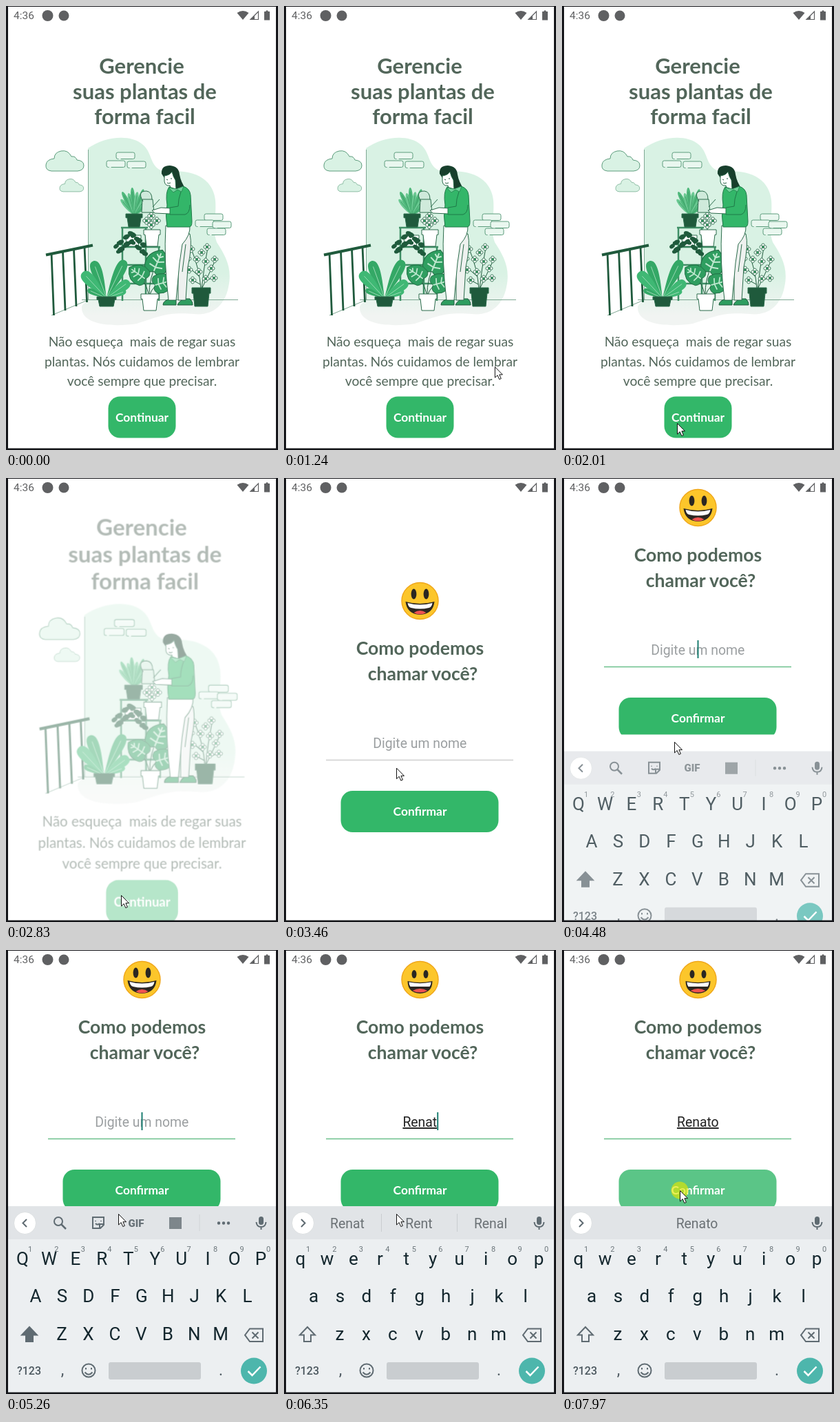
Recreate the animation shown at these times as an HTML page. Size 395 px wide and 643 px high, loop 8000 ms.

```html
<!DOCTYPE html>
<html lang="pt-BR">
<head>
<meta charset="utf-8">
<title>Gerencie suas plantas</title>
<style>
  html, body { margin: 0; width: 100%; height: 100%; overflow: hidden; background: #fff; }
  svg { display: block; width: 395px; height: 643px; }
  text { text-anchor: middle; white-space: pre; }
  .geo { font-family: Lato, sans-serif; fill: #52665a; }
  .bold { font-weight: 700; }
  .label { font-size: 17.4px; font-weight: 700; fill: #fff; }
  .rob { font-family: Roboto, sans-serif; }
  .line { fill: none; stroke: #5f6b72; stroke-width: 2; }
  .ink { fill: #fff; stroke: #2b6b4b; stroke-width: 1; stroke-linejoin: round; }
</style>
</head>
<body>
<svg viewBox="0 0 395 643">
  <defs>
    <linearGradient id="wall" x2="0" y2="1">
      <stop offset=".72" stop-color="#d9f2e4"/><stop offset=".95" stop-color="#f1f4f2"/>
    </linearGradient>
    <g id="flower" fill="#fff" stroke="#2b6b4b" stroke-width=".9">
      <circle cy="-3" r="2.3"/><circle cx="3" r="2.3"/><circle cy="3" r="2.3"/><circle cx="-3" r="2.3"/>
      <circle r="1.5" fill="#33b669"/>
    </g>
    <clipPath id="window"><path id="windowShape"/></clipPath>
  </defs>
  <rect width="395" height="643" fill="#fff"/>

  <g id="home">
    <g class="geo bold" font-size="31">
      <text x="197" y="98">Gerencie</text>
      <text x="201.500" y="134.500">suas plantas de</text>
      <text x="201.500" y="171">forma facil</text>
    </g>
    <g id="art"></g>
    <g class="geo" font-size="19.200">
      <text x="197.500" y="493">Não esqueça  mais de regar suas</text>
      <text x="197.500" y="521.500">plantas. Nós cuidamos de lembrar</text>
      <text x="197.500" y="550">você sempre que precisar.</text>
    </g>
    <g id="continueButton">
      <rect x="148.500" y="565.500" width="98" height="60" rx="17" fill="#33b769"/>
      <text class="geo label" x="197.500" y="601.500">Continuar</text>
    </g>
  </g>

  <g clip-path="url(#window)"><g id="form">
    <g transform="translate(197.500 178)">
      <circle r="26.500" fill="#fcc62b" stroke="#f0a81c" stroke-width="1.500"/>
      <g id="smileBig" fill="#2b2722">
        <ellipse cx="-9" cy="-10" rx="3.900" ry="7.500"/><ellipse cx="9" cy="-10" rx="3.900" ry="7.500"/>
        <path d="M-21 1Q0 7 21 1Q19 19 0 20Q-19 19-21 1"/>
        <path d="M-18 3Q0 8 18 3Q17 9 13 10Q0 13-13 10Q-17 9-18 3" fill="#fff"/>
        <path d="M-9 17Q0 11 9 17Q0 22-9 17" fill="#ef5350"/>
      </g>
      <g id="smileTeeth" fill="#2b2722">
        <ellipse cx="-8.500" cy="-8" rx="3.500" ry="6"/><ellipse cx="8.500" cy="-8" rx="3.500" ry="6"/>
        <path d="M-18 2Q0 6 18 2Q18 19 0 20Q-18 19-18 2"/>
        <path d="M-16 3.500Q0 7 16 3.500Q16 8 14 10H-14Q-16 8-16 3.500" fill="#fff"/>
        <path d="M-11 16Q0 10 11 16Q0 21-11 16" fill="#ef5350"/>
      </g>
    </g>
    <g class="geo bold" font-size="26.600">
      <text x="197.500" y="256">Como podemos</text>
      <text x="201.500" y="293">chamar você?</text>
    </g>
    <text id="field" class="rob" x="197.300" y="391" font-size="19.400"></text>
    <path id="fieldLine" d="M61 408.500H333" stroke-width="1.500"/>
    <rect id="caret" y="370" width="2" height="26" fill="#1c7f72"/>
    <g id="confirmButton">
      <rect x="82.500" y="453" width="229" height="60" rx="17" fill="#33b769"/>
      <text class="geo label" x="197.500" y="489">Confirmar</text>
    </g>
  </g></g>

  <g id="keyboard">
    <path d="M0 371H395V700H0Z" fill="#eceff1"/>
    <path d="M0 371H395V419H0Z" fill="#e1e4e7"/>
    <circle cx="27.500" cy="395.500" r="16" fill="#fff" stroke="#d4d8da" stroke-width=".7"/>
    <path id="chevron" class="line"/>
    <g id="tools" class="line">
      <circle cx="76" cy="393" r="6"/><path d="M80.500 397.500L87 404" stroke-width="2.500"/>
      <path d="M126 387H142V398L137 403H126ZM142 397H136V403M130 392V393M138 392V393M130 396Q133 399 136 396"/>
      <rect x="237" y="387" width="18" height="17" fill="#7d868b" stroke="none"/>
      <path d="M281 383V407" stroke="#d0d4d6" stroke-width="1"/>
      <path d="M309 395.500H325" stroke-width="4.500" stroke-linecap="round" stroke-dasharray="0 7"/>
      <text class="rob" x="189" y="400.500" font-size="15" font-weight="900" fill="#687278" stroke="none">GIF</text>
    </g>
    <g id="suggestions" class="rob" font-size="19.400" fill="#6b7175">
      <text x="92" y="403"></text><text x="196" y="403"></text><text x="300" y="403"></text>
      <path id="dividers" d="M141.500 382V408M251.500 382V408" stroke="#c9cdd0"/>
    </g>
    <rect x="367" y="386" width="7" height="12" rx="3.500" fill="#5f6b72"/>
    <path class="line" d="M363.500 394Q364 401 370.500 401T377.500 394M370.500 401V405"/>
    <g id="keys" class="rob" font-size="26" fill="#14272e"></g>
    <g id="digits" class="rob" font-size="11" fill="#6c767b"></g>
    <path id="shift" class="line" d="M34 546L45 557.500H39V567H29V557.500H23Z"/>
    <path class="line" d="M354 548.500H373V567H354L347 557.700ZM357.500 553.500L366.500 562.500M366.500 553.500L357.500 562.500"/>
    <g class="rob" fill="#4d5960">
      <text x="33.500" y="615" font-size="16" font-weight="500">?123</text>
      <text x="82" y="616" font-size="23">,</text><text x="312" y="616" font-size="23">.</text>
    </g>
    <circle class="line" cx="120" cy="609" r="9.500"/>
    <path class="line" d="M116 605V607.500M124 605V607.500M114.500 611.500Q120 618 125.500 611.500"/>
    <rect x="149" y="597" width="134" height="25" rx="3" fill="#c9cdd0"/>
    <circle cx="360" cy="609.500" r="19" fill="#4db6ac"/>
    <path d="M351.500 610L357.500 616L369.500 603.500" fill="none" stroke="#fff" stroke-width="2.500"/>
  </g>

  <g fill="#5f6062">
    <text class="rob" x="26" y="19" font-size="15.500">4:36</text>
    <circle cx="60.500" cy="14" r="8"/><circle cx="84" cy="14" r="7.500"/>
    <path d="M335.500 10Q344 4 352.500 10L344 20Z"/>
    <path d="M355 19.500H366.500V8Z" fill="none" stroke="#5f6062" stroke-width="1.200"/><path d="M355 20L361 14V20Z"/>
    <path d="M375 8H377.500V6.500H380.500V8H383V20.500H375Z"/>
  </g>

  <g id="pointer">
    <circle id="click" r="12.500" fill="#e3e600" opacity=".65"/>
    <path d="M.5.5V16L4.200 12.600L6.800 18.500L9.400 17.400L6.900 11.700H11.500Z" fill="#fff" stroke="#111"/>
  </g>
  <path d="M0 0H395V643H0ZM3 1V640.500H392V1Z" fill="#15161a" fill-rule="evenodd"/>
</svg>

<script>
const $ = id => document.getElementById(id);
const DARK = '#1f5a3c', GREEN = '#33b669', MID = '#2f9e60';

// --- illustration ---
// A leaf grows up from (x, y); belly < 1 keeps the base slim and the tip round.
const leaf = (x, y, angle, length, width, fill, vein, belly) =>
  `<g transform="translate(${x} ${y}) rotate(${angle})"><path fill="${fill}"
   d="M0 0C${-width * belly} ${-length * .35} ${-width} ${-length} 0 ${-length}C${width} ${-length} ${width * belly} ${-length * .35} 0 0"/>
   <path d="M0 0V${-length * .85}" stroke="${vein}" stroke-width=".8"/></g>`;
const fan = (x, y, leaves, fills, vein, belly) =>
  leaves.map(([a, l, w], i) => leaf(x, y, a, l, w, fills[i % fills.length], vein, belly)).join('');
const pot = (x, y, w, h, fill) =>
  `<path class="ink" style="fill:${fill}" d="M${x} ${y}h${w}v${h * .3}h-2l-2 ${h * .7}h${8 - w}l-2 ${-h * .7}h-2z"/>`;
const brick = ([x, y]) => `<rect x="${x}" y="${y}" width="27" height="9.500" rx="2.500" stroke-dasharray="52 3"/>`;
const flowers = (points, scale) => points.map(([x, y]) =>
  `<use href="#flower" transform="translate(${x} ${y}) scale(${scale})"/>`).join('');
const cloud = (x, y, s) => `<path transform="translate(${x} ${y}) scale(${s})" fill="#d9f2e4" stroke="#5c9c7c"
  d="M8 30H46Q55 29 55 22T45 14Q43 8 37 9Q32-1 22 1Q12 3 12 12Q1 13 0 21T8 30Z"/>`;
const monstera = (x, y, angle, s) => `<g transform="translate(${x} ${y}) rotate(${angle}) scale(${s})">
  <path fill="${MID}" stroke="#1f6b42" d="M0 14Q-8 21-15 13Q-22-8 0-19Q22-8 15 13Q8 21 0 14Z"/>
  <path d="M0 14V-14M0 8L-10 6M0 8L10 6M0 0L-9-4M0 0L9-4M0-7L-5-11M0-7L5-11" stroke="#bfe8cf" stroke-width="2"/></g>`;

const railPosts = [[66, 358, 448], [82.5, 355, 441], [98.5, 352, 435], [114, 349, 429]]
  .map(([x, top, bottom]) => `M${x} ${top}L${x + 3.5} ${bottom}`).join('');
const vines = [...Array(26)].map((_, i) => {
  const x = 160 + i * 17 % 43, y = 329 + i * 11 % 22 + Math.abs(x - 181) * .9;
  return `<ellipse cx="${x}" cy="${y}" rx="4.200" ry="2.900" transform="rotate(${i * 37 % 70 - 35} ${x} ${y})"/>`;
}).join('');

$('art').innerHTML = `
  <path fill="url(#wall)" d="M119 206C142 190 179 184 199 201C214 214 208 236 232 240C270 236 300 248 304 281
    C306 307 299 323 306 342C319 362 329 380 323 407C318 434 299 449 273 446C235 443 224 449 190 460
    C158 465 110 463 110 437C110 429 119 432 119 420Z"/>
  ${cloud(58, 209, 1)}${cloud(78, 250, .63)}
  <g fill="#e9f7ef" stroke="#5c9c7c">
    ${[[160, 212], [146, 224], [176, 225], [288, 301], [275, 310], [300, 312], [292, 322]].map(brick).join('')}
  </g>
  <path d="M119.500 208V426M110 425.500H337M66 448L121 425" stroke="#7fa893" fill="none"/>
  <path d="${railPosts}" stroke="${DARK}" stroke-width="2.800"/>
  <path d="M58 360.500L126 346.500" stroke="${DARK}" stroke-width="4"/>
  <path d="M167 321H206M167 349H224M167 375H224M167 402H224M169 320V427M203 320V427M222 349V427"
    stroke="#3f8f66" stroke-width="2.500" fill="none"/>
  ${fan(186, 303, [[-40, 30, 4], [-27, 38, 4], [-14, 33, 4], [-4, 40, 4], [8, 34, 4], [20, 40, 4], [34, 31, 4], [50, 24, 4]],
    ['#69c891', '#4fb87b'], '#3b9a65', 1)}
  ${pot(174, 301, 24, 19, DARK)}
  ${pot(172, 332, 24, 16, '#fff')}<g fill="${DARK}">${vines}</g>
  <path d="M211 326V302M211 320L204 310M211 320L220 311" stroke="${DARK}"/>
  ${pot(200, 324, 24, 24, '#fff')}
  ${flowers([[211, 304], [204, 311], [219, 311], [211, 317]], 1)}
  <path d="M208 420Q207 395 220 370M208 420Q203 400 193 388M208 420Q214 402 228 402" stroke="${DARK}" fill="none"/>
  ${monstera(220, 371, 22, 1)}${monstera(192, 388, -55, .85)}${monstera(228, 401, 75, .85)}
  ${pot(196, 417, 26, 24, '#fff')}
  ${fan(146, 423, [[-20, 57, 15], [-43, 51, 16], [26, 61, 15], [54, 41, 14], [-66, 30, 8], [70, 30, 8]],
    ['#34a866', '#3fb874'], '#a5dfbd', .3)}
  ${pot(132, 421, 28, 14, DARK)}
  <path d="M283 410Q281 380 269 352M284 410Q287 380 293 350M284 410Q294 390 304 368M281 392L265 378M282 403L269 396M288 399L303 392"
    stroke="${DARK}" fill="none"/>
  ${flowers([[269, 352], [292, 349], [303, 367], [264, 366], [277, 367], [290, 370], [298, 380], [266, 382], [280, 385], [302, 394], [271, 397], [290, 395], [284, 357]], .95)}
  ${pot(270, 408, 27, 27, DARK)}

  <path d="M228 433Q228 426 240 424H247V433ZM249 433Q252 426 260 424H267Q272 429 271 433Z" fill="${MID}" stroke="${DARK}"/>
  <path class="ink" d="M246 330H267Q271 347 264 378L261 426H250L250 378Z" style="fill:#eef1ef"/>
  <path class="ink" d="M232 318H267Q268 332 256 345L252 372L247 426H236Q229 370 232 318ZM261 345L256 385"/>
  <path d="M226 243Q225 231 238 231Q251 232 252 244Q254 256 262 266Q251 272 240 264Z" fill="#173f2c"/>
  <path class="ink" d="M230 246Q238 245 241 240Q243 248 246 252L247 266L239 264L238 260Q231 261 230 254Z"/>
  <path d="M233 251L235 252M239 250L241 250M234 256Q236 258 239 256" stroke="${DARK}" fill="none"/>
  <path d="M237 262L249 266L257 261Q267 264 268 274L270 312Q270 320 266 320H234Q231 304 234 288Q231 270 237 262Z" fill="${GREEN}" stroke="#1f7a48"/>
  <path d="M236 263L243 270L249 266L255 269L258 261L247 265Z" fill="#6fd199" stroke="#1f7a48" stroke-width=".7"/>
  <path class="ink" d="M198 280H213L215 299H197ZM213 291L223 280M199 283Q190 268 204 268Q212 269 212 280" style="fill:#cfeadb"/>
  <path class="ink" d="M240 293L225 292L212 296L216 300L239 301Z"/>
  <path d="M254 269Q250 280 250 290L238 292V302H260Q267 300 267 288" fill="${GREEN}" stroke="#1f7a48"/>
`;

// --- keyboard ---
const rows = [['qwertyuiop', 24, 456], ['asdfghjkl', 43, 510], ['zxcvbnm', 81, 565]];
const drawKeys = upper => rows.map(([letters, x, y]) => [...letters].map((c, i) =>
  `<text x="${x + i * 38.45}" y="${y}">${upper ? c.toUpperCase() : c}</text>`).join('')).join('');
$('digits').innerHTML = [...'1234567890'].map((d, i) =>
  `<text x="${35 + i * 38.45}" y="437">${d}</text>`).join('');

// --- timeline ---
const LOOP = 8000, SCROLL_AT = 4400, FOCUS_AT = 4040;
const typing = [
  [5560, 'R', ['R', 'Re', 'Rio']],
  [5950, 'Re', ['Re', 'Real', 'Red']],
  [6100, 'Ren', ['Ren', 'Rent', 'Rental']],
  [6200, 'Rena', ['Rena', 'Renal', 'Renew']],
  [6350, 'Renat', ['Renat', 'Rent', 'Renal']],
  [6510, 'Renato', ['', 'Renato', '']],
];
const pointerPath = [
  [960, 362, 640], [1200, 318, 535], [1430, 250, 463], [1620, 190, 488], [1760, 161, 530],
  [1880, 157, 575], [2010, 167, 604], [2980, 167, 604], [3200, 166, 535], [3460, 163, 420],
  [3590, 163, 376], [3690, 163, 382], [7460, 163, 382], [7710, 171, 348],
];
const clicks = [[2390, 2470], [3940, 4020], [7870, LOOP]];

const clamp = v => Math.min(1, Math.max(0, v));
const span = (t, from, to) => clamp((t - from) / (to - from));
const within = (t, from, to) => t >= from && t < to;
const show = (id, on) => $(id).setAttribute('display', on ? 'inline' : 'none');
const set = (id, name, value) => $(id).setAttribute(name, value);

function along(path, t) {
  const i = path.findIndex(p => p[0] > t);
  if (i < 0) return path.at(-1).slice(1);
  if (i === 0) return path[0].slice(1);
  const [a, b] = [path[i - 1], path[i]], k = span(t, a[0], b[0]);
  return [a[1] + (b[1] - a[1]) * k, a[2] + (b[2] - a[2]) * k];
}

let keysUpper = null;
function drawKeyboard(t, typed) {
  const k = 1 - (1 - span(t, SCROLL_AT, 4620)) ** 2;
  const upper = !typed;
  show('keyboard', t >= SCROLL_AT);
  set('keyboard', 'transform', `translate(0 ${62 * (1 - k)})`);
  set('keyboard', 'opacity', .35 + .65 * k);
  if (upper !== keysUpper) $('keys').innerHTML = drawKeys(keysUpper = upper);
  set('shift', 'style', upper ? 'fill:#5f6b72' : '');
  set('chevron', 'd', upper ? 'M30 390L24.500 395.500L30 401' : 'M25 390L30.500 395.500L25 401');
  show('tools', upper);
  show('suggestions', !upper);
  if (typed) {
    document.querySelectorAll('#suggestions text').forEach((el, i) => el.textContent = typed[2][i]);
    show('dividers', typed[2][0]);
  }
}

function drawForm(t, typed) {
  const scrolled = t >= SCROLL_AT;
  set('form', 'opacity', span(t, 2850, 3010));
  set('form', 'transform', `translate(0 ${scrolled ? -135 : 0})`);
  set('windowShape', 'd', `M0 0H395V${scrolled ? 371.5 : 643}H0Z`);
  show('smileBig', !typed);
  show('smileTeeth', typed);
  const field = $('field');
  field.textContent = typed ? typed[1] : 'Digite um nome';
  field.setAttribute('fill', typed ? '#222' : '#9b9fa1');
  field.setAttribute('text-decoration', typed ? 'underline' : 'none');
  set('fieldLine', 'stroke', t >= FOCUS_AT ? '#6cc08c' : '#cfcfcf');
  set('caret', 'x', typed ? 197.3 + field.getComputedTextLength() / 2 : 196.5);
  show('caret', within(t, FOCUS_AT, 4770) || within(t, 5260, 7000) || within(t, 7490, 7960));
  set('confirmButton', 'opacity', 1 - .2 * span(t, 7870, 7960));
}

function drawHome(t) {
  const grow = 1 - (1 - span(t, 2670, 3070)) ** 4.3;
  const s = 1 + .075 * grow;
  show('home', t < 2970);
  set('home', 'transform', `translate(197.500 318) scale(${s}) translate(-197.500 -318)`);
  set('home', 'opacity', 1 - span(t, 2670, 2960));
  set('continueButton', 'opacity', 1 - .2 * span(t, 2390, 2470));
}

function frame() {
  const t = performance.now() % LOOP;
  const typed = typing.findLast(step => t >= step[0]);
  drawHome(t);
  drawForm(t, typed);
  drawKeyboard(t, typed);
  show('pointer', t >= 960);
  set('pointer', 'transform', `translate(${along(pointerPath, t)})`);
  show('click', clicks.some(([from, to]) => within(t, from, to)));
  requestAnimationFrame(frame);
}
frame();
</script>
</body>
</html>
```
